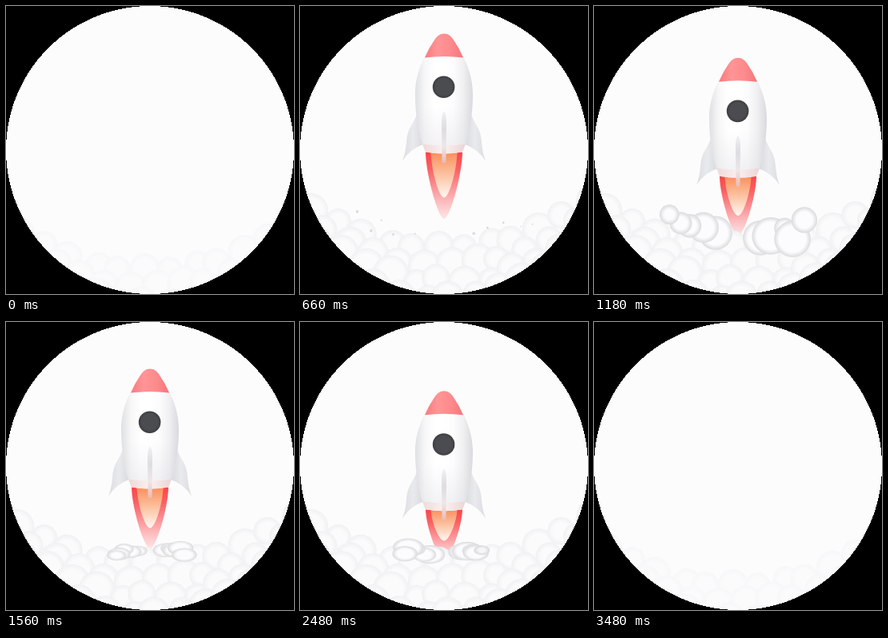
These frames come from a looping animation (360x360 px, 3540 ms). An HTML page with a canvas:

```html
<!DOCTYPE html>
<html lang="en">
<head>
<meta charset="utf-8">
<title>Rocket launch</title>
<style>
  html, body { margin: 0; width: 100%; height: 100%; overflow: hidden; background: #000; }
  canvas { display: block; width: 360px; height: 360px; }
</style>
</head>
<body>
<canvas id="stage" width="360" height="360"></canvas>
<script>
const LOOP = 3540, SIZE = 360, MID = SIZE / 2;
const ctx = document.getElementById('stage').getContext('2d');

const clamp = (v, a = 0, b = 1) => Math.min(b, Math.max(a, v));
const mix = (a, b, k) => a + (b - a) * k;
const part = (t, a, b) => clamp((t - a) / (b - a));
const sway = u => (1 - Math.cos(Math.PI * u)) / 2;
const easeIn = u => u ** 2.63;
const easeOut = u => 1 - (1 - u) ** 2.6;
const swell = u => Math.sin(Math.PI * u ** 0.7);
const grey = v => `rgb(${v | 0},${v | 0},${(v | 0) + 2})`;

function seeded(s) {
  return (a = 0, b = 1) => {
    s = (s * 16807) % 2147483647;
    return mix(a, b, s / 2147483647);
  };
}

// Turning points as [time, value, easing towards it]
const flight = [[20, 380], [850, 27, easeOut], [1290, 71], [1740, 52], [2600, 88], [2980, -270, easeIn]];
const burn = [[0, 98], [1180, 77], [1560, 79], [2300, 53], [2820, 100]];

function along(keys, t) {
  let value = keys[0][1];
  for (let i = 1; i < keys.length; i++) {
    const [end, to, ease = sway] = keys[i], from = keys[i - 1];
    if (t >= from[0]) value = mix(from[1], to, ease(part(t, from[0], end)));
  }
  return value;
}

function makeBank() {
  const rnd = seeded(4211), bank = [];
  for (let row = 0; row < 4; row++) {
    for (let x = 18 + (row % 2) * 15; x < SIZE; x += 31) {
      const q = (x - MID) / 155;
      bank.push({ x: x + rnd(-5, 5), y: 303 - 47 * q * q + row * 21 + rnd(-5, 5), r: rnd(16, 23) });
    }
  }
  return bank;
}

// Puffs leave the nozzle to both sides, swell and shrink away
function makeBurst([start, life], n) {
  const rnd = seeded(977 + n * 5407), puffs = [];
  for (let i = 0; i < 10; i++) {
    const reach = 42 + (i >> 1) * 16 + rnd(-6, 6);
    puffs.push({ dx: i % 2 ? reach : -reach, dy: -reach * rnd(0, 0.4), r: rnd(11, 24) });
  }
  return { start, life, puffs };
}

const bank = makeBank();
const bursts = [[80, 600], [940, 620], [1440, 750], [2360, 640]].map(makeBurst);

function shade(x0, y0, x1, y1, ...colors) {
  const g = ctx.createLinearGradient(x0, y0, x1, y1);
  colors.forEach((c, i) => g.addColorStop(i / (colors.length - 1), c));
  return g;
}

function fill(path, style) {
  ctx.fillStyle = style;
  ctx.fill(path);
}

function ball(x, y, r, core, edge, rim, squash = 1) {
  if (r < 0.4) return;
  ctx.save();
  ctx.translate(x, y);
  ctx.scale(1, squash);
  const g = ctx.createRadialGradient(0, 0, 0, 0, 0, r);
  g.addColorStop(clamp(1 - rim / r, 0.1, 0.9), core);
  g.addColorStop(1, edge);
  ctx.fillStyle = g;
  ctx.beginPath();
  ctx.arc(0, 0, r, 0, Math.PI * 2);
  ctx.fill();
  ctx.restore();
}

const body = new Path2D('M0 0C5 0 9 3 12 8C24 26 36 48 36 76C36 106 30 132 23 148Q0 152 -23 148C-30 132 -36 106 -36 76C-36 48 -24 26 -12 8C-9 3 -5 0 0 0Z');
const nose = new Path2D('M0 0C5 0 9 3 12 8Q19 18 24 30Q0 27 -24 30Q-19 18 -12 8C-9 3 -5 0 0 0Z');
const fin = new Path2D('M-33 97C-36 112 -46 116 -47 136Q-48 149 -52 159Q-42 144 -25 138Z');
const band = new Path2D('M-27 138Q0 142 27 138L23 148Q0 152 -23 148Z');
const keel = new Path2D('M0 97Q3 101 3 110L2.5 160Q0 164 -2.5 160L-3 110Q-3 101 0 97Z');

const bodyTone = shade(-36, 0, 36, 0, '#dfe0e3', '#f7f7f8', '#fff', '#fff', '#fcfcfd', '#f0f0f2', '#d9dade');
const bodyDusk = shade(0, 90, 0, 150, 'rgba(205,206,212,0)', 'rgba(205,206,212,.3)');
const noseTone = shade(-24, 0, 24, 0, '#f97a7e', '#ff9496', '#fd8b8d', '#f4757a');
const finTone = shade(-52, 0, -25, 0, '#dcdde0', '#e9eaed', '#d8d9dd');
const bandTone = shade(-26, 0, 26, 0, '#f0dada', '#fcf0f0', '#ecd6d7');
const keelTone = shade(0, 97, 0, 163, '#f0f0f2', '#dcdde0', '#efe6e7', '#e9b8ae');

function flame(w, len, ...colors) {
  const top = 147, end = 146 + len, k = top + len * 0.34;
  fill(new Path2D(`M${-w} ${top}C${-w} ${k} -7 ${end} 0 ${end}C7 ${end} ${w} ${k} ${w} ${top}Z`),
    shade(0, top, 0, end, ...colors));
}

function rocket(t) {
  const len = along(burn, t);
  ctx.save();
  ctx.translate(MID, along(flight, t));
  flame(23, len, '#fb4346', '#fa5f62', '#fb8c8f', '#fdbcbe', '#fee6e7');
  flame(16.5, len * 0.9 - 18, '#fa8c58', '#fbb088', '#fdd3ba', '#fff8f4');
  for (const side of [1, -1]) {
    ctx.save();
    ctx.scale(side, 1);
    fill(fin, finTone);
    ctx.restore();
  }
  fill(body, bodyTone);
  fill(body, bodyDusk);
  fill(band, bandTone);
  fill(nose, noseTone);
  fill(keel, keelTone);
  ball(-0.4, 66.7, 13.8, '#4b4c50', '#3d3e42', 4);
  ctx.restore();
}

function clouds(t) {
  const lift = sway(part(t, 40, 420)) - sway(part(t, 2850, 3200));
  const edge = grey(mix(247, 241, lift));
  for (const { x, y, r } of bank) ball(x, y + 28 * (1 - lift), r, '#fbfbfc', edge, 7);
}

function smoke(t) {
  for (const { start, life, puffs } of bursts) {
    const u = part(t, start, start + life);
    if (u <= 0 || u >= 1) continue;
    const go = 1 - (1 - u) ** 3, squash = mix(0.4, 1, part(u, 0.1, 0.35));
    for (const { dx, dy, r } of puffs) {
      const size = r * swell(u), pale = part(size, 5, 11);
      ball(MID + dx * go, 292 + dy * go, size,
        grey(mix(222, 252, pale)), grey(mix(206, 219, pale)), 6, squash);
    }
  }
}

// Hard-edged round window
function corners() {
  ctx.fillStyle = '#000';
  for (let y = 0; y < SIZE; y++) {
    const w = Math.round(MID - Math.sqrt(MID ** 2 - (y + 0.5 - MID) ** 2));
    ctx.fillRect(0, y, w, 1);
    ctx.fillRect(SIZE - w, y, w, 1);
  }
}

function draw(t) {
  ctx.fillStyle = '#fcfcfc';
  ctx.fillRect(0, 0, SIZE, SIZE);
  rocket(t);
  clouds(t);
  smoke(t);
  corners();
}

const begin = performance.now();
function tick() {
  draw((performance.now() - begin) % LOOP);
  requestAnimationFrame(tick);
}
tick();
</script>
</body>
</html>
```
